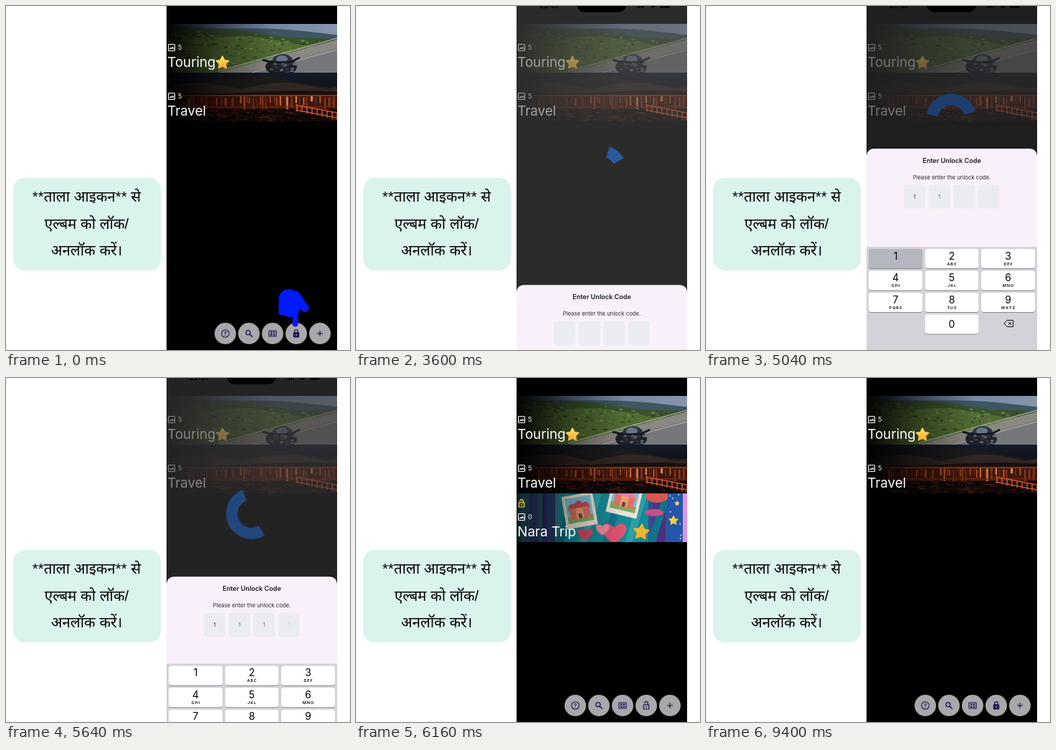
These frames come from a looping animation (480 by 480 pixels, 9880 ms). An HTML page with a canvas:

```html
<!DOCTYPE html>
<html lang="hi">
<head>
<meta charset="utf-8">
<title>Album lock</title>
<style>
html, body { margin: 0; width: 100%; height: 100%; overflow: hidden; background: #fff; }
canvas { display: block; width: 480px; height: 480px; }
</style>
</head>
<body>
<canvas id="stage" width="480" height="480"></canvas>
<script>
const LOOP = 9880;
const L = 224, W = 238, MID = 343, ROW = 68;
const UI = "Inter, Roboto, sans-serif";
const HINDI = "'Liberation Sans', 'Noto Sans Devanagari', 'Noto Sans', sans-serif";
const NAVY = "#1f1452";
const view = document.getElementById("stage").getContext("2d");
let c = view;

const clamp = x => Math.max(0, Math.min(1, x));
const span = (t, from, len) => clamp((t - from) / len);
const easeOut = p => 1 - Math.pow(1 - p, 3);
const tapTime = i => 4110 + i * 500;

// cubic-bezier(.4, 0, .2, 1)
function standardEase(x) {
  let lo = 0, hi = 1;
  for (let i = 0; i < 16; i++) {
    const s = (lo + hi) / 2, r = 1 - s;
    if (1.2 * r * r * s + 0.6 * r * s * s + s * s * s < x) lo = s; else hi = s;
  }
  return lo * lo * (3 - 2 * lo);
}
function seeded(seed) {
  return () => (seed = (seed * 16807) % 2147483647) / 2147483647;
}
function box(x, y, w, h, color, r = 0) {
  c.fillStyle = color;
  c.beginPath();
  c.roundRect(x, y, w, h, r);
  c.fill();
}
function frame(x, y, w, h, color, width, r = 0) {
  c.strokeStyle = color;
  c.lineWidth = width;
  c.beginPath();
  c.roundRect(x, y, w, h, r);
  c.stroke();
}
function disc(x, y, rx, ry, color) {
  c.fillStyle = color;
  c.beginPath();
  c.ellipse(x, y, rx, ry, 0, 0, 7);
  c.fill();
}
function ring(x, y, r, color, width, from = 0, to = 7) {
  c.strokeStyle = color;
  c.lineWidth = width;
  c.beginPath();
  c.arc(x, y, r, from, to);
  c.stroke();
}
function line(color, width, ...p) {
  c.strokeStyle = color;
  c.lineWidth = width;
  c.beginPath();
  for (let i = 0; i < p.length; i += 2) c.lineTo(p[i], p[i + 1]);
  c.stroke();
}
function text(s, x, y, font, color, align = "left") {
  c.font = font;
  c.fillStyle = color;
  c.textAlign = align;
  c.fillText(s, x, y);
}
function ramp(x0, y0, x1, y1, ...colors) {
  const g = c.createLinearGradient(x0, y0, x1, y1);
  colors.forEach((k, i) => g.addColorStop(i / (colors.length - 1), k));
  return g;
}
// fills a row below the height top(u), u running from 0 to 1
function ridge(color, top) {
  c.fillStyle = color;
  c.beginPath();
  c.moveTo(0, ROW);
  for (let x = 0; x <= W; x += 2) c.lineTo(x, top(x / W));
  c.lineTo(W, ROW);
  c.fill();
}
function star(x, y, r, color, turn = 0) {
  c.fillStyle = c.strokeStyle = color;
  c.lineWidth = r * 0.16;
  c.lineJoin = "round";
  c.beginPath();
  for (let i = 0; i < 10; i++) {
    const a = i * Math.PI / 5 - Math.PI / 2 + turn, d = i % 2 ? r * 0.52 : r;
    c.lineTo(x + d * Math.cos(a), y + d * Math.sin(a));
  }
  c.closePath();
  c.fill();
  c.stroke();
}
function heart(x, y, r, color) {
  c.fillStyle = color;
  c.beginPath();
  c.moveTo(x, y + r);
  c.bezierCurveTo(x - 2 * r, y - r * 0.2, x - r, y - 1.5 * r, x, y - r * 0.5);
  c.bezierCurveTo(x + r, y - 1.5 * r, x + 2 * r, y - r * 0.2, x, y + r);
  c.fill();
}

function roadPhoto() {
  const rnd = seeded(17);
  const hill = u => 1 + 22 * u + 1.5 * Math.sin(11 * u);
  const road = u => 68 - 66 * (u - 0.3);
  box(0, 0, W, ROW, ramp(0, 0, W, 0, "#3c4a63", "#6f819d", "#8796ad"));
  ridge("#3f5560", u => 14 * u + 2 * Math.sin(7 * u));
  ridge("#3a5130", hill);
  ridge("#526b33", u => hill(u) + 9 + 3 * Math.sin(8 * u));
  for (let i = 0; i < 420; i++) {
    const u = rnd(), y = hill(u) + 3 + rnd() * 58;
    disc(u * W, y, 1 + rnd() * 3, 0.6 + rnd(), `hsl(${78 + rnd() * 25} 38% ${17 + rnd() * 23}%)`);
  }
  ridge("#8b8881", road);
  ridge("#76777a", u => road(u) + 12);
  line("#c9c8bf", 1, 0.3 * W, 66, W, 20);
  line("#b5b6b4", 1, 0.5 * W, 68, W, 36);
  // motorcycle
  disc(160, 60, 22, 12, "#1d2026");
  disc(162, 51, 14, 9, "#2c333c");
  disc(161, 49, 8, 5, "#66758a");
  line("#15181d", 3, 134, 50, 148, 54, 174, 53, 186, 47);
  for (let i = 0; i < 22; i++) disc(146 + rnd() * 34, 54 + rnd() * 13, 2.5, 1.2, `hsl(215 10% ${10 + rnd() * 40}%)`);
}

function templePhoto() {
  const rnd = seeded(41);
  box(0, 0, W, ROW, ramp(0, 0, 0, ROW, "#141b2a", "#100d0e", "#0c0706"));
  ridge("#1b1b1c", u => 20 - 16 * Math.pow(Math.sin(Math.PI * u), 2));
  ridge("#302722", u => 23 - 9 * Math.abs(Math.sin(2 * Math.PI * u + 0.4)));
  ridge("#1a100d", u => 27 + 2 * Math.sin(6 * u));
  box(20, 31, W, 20, "#3d160e");
  for (let x = 24; x < W; x += 2 + rnd() * 5) {
    const glow = rnd() * (0.5 + x / W);
    box(x, 32 + rnd() * 3, 1 + rnd() * 2, 8 + rnd() * 11, `hsl(${9 + glow * 15} 68% ${14 + glow * 34}%)`);
  }
  box(20, 31, W, 2, "#8c3219");
  box(20, 47, W, 1.5, "#702714");
  ridge("#0f0808", () => 51);
  for (let i = 0; i < 110; i++)
    box(20 + rnd() * W, 51 + rnd() * 16, 2 + rnd() * 9, 0.8, `hsl(13 58% ${8 + rnd() * 18}%)`);
  for (let i = 0; i < 9; i++) {
    const x = 182 + i * 7;
    line("#dc6c40", 1.3, x, 44 + i * 1.5, x, 54 + i * 1.5);
  }
  for (const dy of [0, 7]) line("#cf4d2b", 1.5, 180, 45 + dy, W, 56 + dy);
}

function polaroid(x, y, turn, sky, toy) {
  c.save();
  c.translate(x, y);
  c.rotate(turn);
  box(-22, -23, 44, 46, "#ece3d6", 1);
  box(-18, -19, 36, 35, sky);
  box(-18, 7, 36, 9, "#7fac62");
  for (const i of [-1, 1, 0]) {
    disc(i * 9, -4 - 3 * !i, 6, 7, toy);
    box(i * 9 - 5, -4, 10, 15, i ? "#dc7465" : "#eba070");
  }
  box(-2.5, 4, 5, 7, "#763e45", 2);
  c.restore();
}
function scrapPhoto() {
  const rnd = seeded(8);
  const stripes = (from, to, hue) => {
    for (let x = from; x < to; x += 6) box(x, 0, 6, ROW, `hsl(${hue + rnd() * 90} 45% ${30 + rnd() * 18}%)`);
  };
  box(0, 0, W, ROW, "#168a96");
  stripes(0, 58, 185);
  stripes(184, 210, 195);
  for (let i = 0; i < 5; i++) line(i % 2 ? "#2d9fa5" : "#0f7389", 10, 60 + i * 32, 70, 82 + i * 32, 0);
  disc(196, 4, 16, 9, "#d95950");
  disc(192, 27, 13, 5, "#c94e86");
  polaroid(88, 24, -0.17, "#7cc4d3", "#c94a5d");
  polaroid(151, 8, 0.23, "#88bdd9", "#df83a6");
  heart(96, 57, 9, "#d9486b");
  heart(136, 55, 15, "#e05472");
  heart(120, 50, 8, "#f08a9c");
  star(174, 54, 11, "#efb52e", 0.12);
  box(211, 0, 21, ROW, "#2456aa");
  for (let i = 0; i < 8; i++) disc(213 + rnd() * 17, rnd() * ROW, 1, 1, "#e6dcf5");
  star(219, 38, 6.5, "#f8cf3d");
  star(224, 14, 3.5, "#e9d580");
  box(232, 0, 6, ROW, "#df94e2");
}

function pictureIcon(y) {
  frame(226.5, y - 4.5, 9, 9, "#fff", 1.1, 1);
  line("#fff", 1.2, 228, y + 2.3, 230, y + 0.3, 231.2, y + 1.6, 232.8, y - 0.5, 234.3, y + 2.3);
}
function lockIcon(x, y, color, open) {
  ring(x, y - 3, 2.3, color, 1.2, Math.PI, 0);
  line(color, 1.2, x + 2.3, y - 3, x + 2.3, y - 1);
  if (open) {
    frame(x - 3.7, y - 1.2, 7.4, 6.2, color, 1.2);
    disc(x, y + 2, 1, 1, color);
  } else {
    line(color, 1.2, x - 2.3, y - 3, x - 2.3, y - 1);
    box(x - 4.2, y - 1.8, 8.4, 7.4, color, 1);
    disc(x, y + 1.9, 1, 1, "#a9a7ac");
  }
}

function album(y, paint, shade) {
  const art = document.createElement("canvas");
  art.width = W;
  art.height = ROW;
  c = art.getContext("2d");
  paint();
  box(0, 0, W, ROW, ramp(0, 0, 150, 0, `rgba(0,0,0,${shade})`, `rgba(0,0,0,${shade * 0.4})`, "rgba(0,0,0,0)"));
  c = view;
  return (name, count) => {
    c.drawImage(art, L, y);
    pictureIcon(y + 33);
    text(count, 240, y + 36.3, "9px " + UI, "#fff");
    text(name, 225.3, y + 60, "18.7px " + UI, "#fff");
  };
}
const touring = album(25, roadPhoto, 0.95);
const travel = album(93, templePhoto, 0.95);
const trip = album(161, scrapPhoto, 0.72);

function buttons(t, open) {
  const y = 457;
  for (let i = 0; i < 5; i++) disc(306 + i * 33, y, 15, 15, "#a9a7a9");
  for (const at of [3400, 7800]) {
    const p = span(t, at, 440), r = 15 * easeOut(p);
    if (p > 0 && p < 1) disc(405, y, r, r, `rgba(31,20,82,${0.25 * (1 - p)})`);
  }
  ring(306, y, 5.3, NAVY, 1.1);
  text("?", 306, y + 3, "600 8px " + UI, NAVY, "center");
  ring(337.8, y - 1.3, 3, NAVY, 1.3);
  line(NAVY, 1.6, 340, y + 1, 343.8, y + 4.8);
  frame(367, y - 4, 10, 8, NAVY, 1.2);
  for (const dx of [-3, 0.7]) for (const dy of [-2.6, 0.6]) box(372 + dx, y + dy, 2.4, 2.2, NAVY);
  lockIcon(405, y, NAVY, open);
  line(NAVY, 1.2, 434, y, 442, y);
  line(NAVY, 1.2, 438, y - 4, 438, y + 4);
}

function hand(t) {
  const p = span(t, 520, 920), blue = "#0019ff";
  if (p >= 1) return;
  const k = 1 + 0.2 * Math.sin(Math.PI * Math.min(1, p / 0.7));
  c.save();
  c.globalAlpha = 1 - span(p, 0.6, 0.4);
  c.translate(401.5, 421);
  c.scale(k, k);
  c.translate(-401.5, -421);
  c.lineCap = "round";
  box(380.5, 395, 29, 33, blue, [14, 15, 2, 4]);
  box(399.7, 405, 7.8, 42.5, blue, 4);
  line(blue, 11, 404, 403, 417, 421.5);
  for (let i = 0; i < 3; i++) disc(384.5 + i * 5.7, 427 + i * 1.6, 4, 4.2, blue);
  c.restore();
}

function spinner(t, y) {
  const ms = t - 3460, cycle = ms / 1333 % 1, deg = Math.PI / 180;
  const head = standardEase(clamp(cycle * 2)), tail = standardEase(clamp(cycle * 2 - 1));
  const from = -106 + tail * 270 + cycle * 90 + ms * 0.178;
  const sweep = Math.max(0.5, (head - tail) * 270);
  ring(342.5, y, 27.5, "#4088f0", 16, from * deg, (from + sweep) * deg);
}

function statusBar() {
  text("22:37", 256, 3, "600 10px " + UI, "#000");
  box(308, -14, 69, 22.5, "#000", 11);
  for (let i = 0; i < 4; i++) box(391 + i * 3, 1 - i, 2, 1.5 + i, "#000");
  disc(414, -1, 4, 3, "#000");
  box(424, -5, 14, 7.5, "#000", 2);
}

function sheet(t, top) {
  box(L, top, W, 480, "#f8f1fb", 10);
  text("Enter Unlock Code", MID, top + 20, "600 9.1px " + UI, "#1d1a22", "center");
  text("Please enter the unlock code.", MID, top + 42.5, "7.75px " + UI, "#2b2830", "center");
  for (let i = 0; i < 4; i++) {
    const x = 276 + i * 34.6, a = span(t, tapTime(i), 200) * (i ? 0.6 : 0.9);
    box(x, top + 50.5, 30, 33, "#eaecf2", 4);
    if (a) text("1", x + 15, top + 69.5, "8px " + UI, `rgba(30,35,45,${a})`, "center");
  }
}

function keyboard(t, top) {
  const letters = ["", "ABC", "DEF", "GHI", "JKL", "MNO", "PQRS", "TUV", "WXYZ"];
  const pressed = [0, 1, 2, 3].some(i => t > tapTime(i) - 100 && t < tapTime(i) - 10);
  const key = (col, row, label, dy, color = "#fff") => {
    const x = 227 + col * 78.5, y = top + 3 + row * 30.5;
    box(x, y + 1, 75, 27, "#898b90", 3.5);
    box(x, y, 75, 27, color, 3.5);
    text(label, x + 37.5, y + dy, "14px " + UI, "#000", "center");
    return [x + 38, y + 22.6];
  };
  box(L, top, W, 150, "#d2d3d9");
  letters.forEach((s, i) => {
    const [x, y] = key(i % 3, Math.floor(i / 3), i + 1, 14.8, !i && pressed ? "#b4b7bf" : "#fff");
    c.letterSpacing = "1px";
    text(s, x, y, "600 5.3px " + UI, "#000", "center");
    c.letterSpacing = "0px";
  });
  key(1, 3, "0", 18.5);
  const y = top + 107;
  line("#111", 1, 420, y - 4.5, 428.5, y - 4.5, 428.5, y + 4.5, 420, y + 4.5, 416, y, 420, y - 4.5);
  for (const d of [-2, 2]) line("#111", 1, 422, y - d, 426, y + d);
}

function unlockScene(t) {
  box(L, 0, W, 480, "rgba(255,255,255,.26)");
  const open = easeOut(span(t, 3525, 250)) * (1 - Math.pow(span(t, 5600, 250), 1.2));
  const keys = easeOut(span(t, 3640, 400)) * Math.pow(1 - span(t, 5563, 450), 3);
  const keyTop = 480 - 144 * keys;
  spinner(t, (keyTop - 20) / 2);
  box(L, 0, W, 480, `rgba(0,0,0,${0.54 * open})`);
  statusBar();
  if (open > 0) sheet(t, keyTop - 137 * open);
  if (keys > 0) keyboard(t, keyTop);
}

function draw(t) {
  box(0, 0, 480, 480, "#fff");
  box(10, 240, 206, 129, "#daf3ec", 16);
  ["**ताला आइकन** से", "एल्बम को लॉक/", "अनलॉक करें।"].forEach((s, i) =>
    text(s, 112.5, 273 + i * 37.5, "500 20.5px " + HINDI, "#000", "center"));

  c.save();
  c.beginPath();
  c.rect(L, 0, W, 480);
  c.clip();
  box(L, 0, W, 480, "#000");
  touring("Touring", "5");
  star(302, 79.3, 9.2, ramp(0, 69, 0, 88, "#ffe36a", "#f7a928"));
  travel("Travel", "5");
  const open = t >= 6120 && t < 7880;
  if (open) {
    trip("Nara Trip", "0");
    lockIcon(231, 175, "#ffd83a", true);
  }
  buttons(t, open);
  if (t >= 3460 && t < 6120) unlockScene(t);
  hand(t);
  c.restore();
}

const begin = performance.now();
function tick() {
  draw((performance.now() - begin) % LOOP);
  requestAnimationFrame(tick);
}
tick();
</script>
</body>
</html>
```
